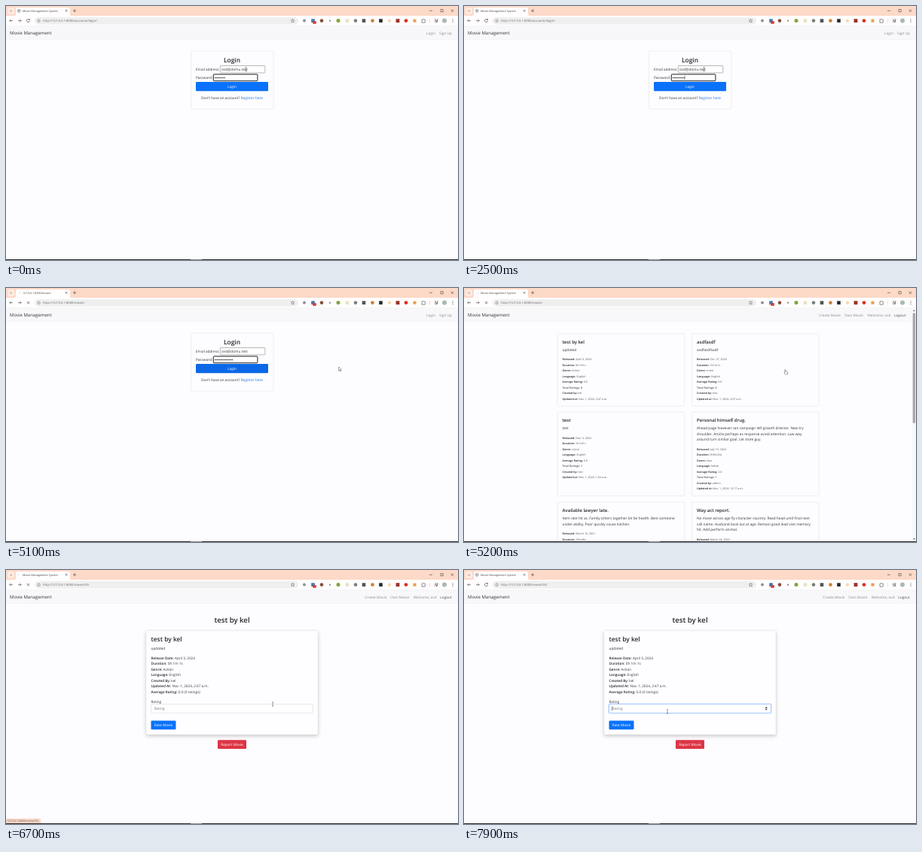
Animation, 600 px wide and 338 px high, one loop 8000 ms. Source, as an HTML page:

```html
<!DOCTYPE html>
<html lang="en">
<head>
<meta charset="utf-8">
<title>Movie Management System</title>
<style>
html, body { margin: 0; width: 100%; height: 100%; overflow: hidden; background: #fdfcfe; }
svg { display: block; width: 100vw; height: 100vh; font-family: "Open Sans", "Noto Sans", sans-serif; text-rendering: geometricPrecision; }
.b { font-weight: 600; }
</style>
</head>
<body>
<svg id="stage" viewBox="0 0 600 338"></svg>
<script>
const PAGE = '#fdfcfe', INK = '#34363a', BLUE = '#0a72fa', BODY = 4.75;
const USER = 'ovd', AUTHOR = 'kel', HOST = '127.0.0.1:8000';

// Drawing helpers; text is placed by its vertical centre.
const text = (x, y, size, s, fill = INK, attr = '') =>
  `<text x="${x}" y="${y + size * .36}" font-size="${size}" fill="${fill}" ${attr}>${s}</text>`;
const bold = (x, y, size, s, attr = '') => text(x, y, size, s, '#25272b', 'class="b" ' + attr);
const rect = (x, y, w, h, fill, attr = '') =>
  `<rect x="${x}" y="${y}" width="${w}" height="${h}" fill="${fill}" ${attr}/>`;
const circle = (x, y, r, fill, attr = '') => `<circle cx="${x}" cy="${y}" r="${r}" fill="${fill}" ${attr}/>`;
const line = (d, color = '#444', w = .6, attr = '') =>
  `<path d="${d}" fill="none" stroke="${color}" stroke-width="${w}" ${attr}/>`;
const group = (id, ...parts) => `<g id="${id}">${parts.join('')}</g>`;
const field = (label, value) => `<tspan class="b" fill="#25272b">${label}:</tspan> ${value}`;
const MID = 'text-anchor="middle"';

function browser() {
  const icons = [
    [396, '#8d9096', 4], [407.5, '#3f78b5', 4.6], [419, '#85503c', 4.6], [430, '#8a8f8a', 2], [441, '#7fa63c', 5],
    [453, '#e6e2c4', 4.4], [464, '#77817a', 4.6], [475, '#4d5358', 4.6], [486.5, '#c98036', 4.6], [497.5, '#26282c', 4.6],
    [509, '#f2d9b4', 4.4], [520, '#9c3227', 4.8], [531, '#dd3023', 4.8], [542.5, '#e6a04c', 4]
  ];
  const marks = icons.map(([x, c, s], i) => i % 2
    ? rect(x - s / 2, 19.6 - s / 2, s, s, c) : circle(x, 19.6, s / 2, c));
  return rect(0, 0, 600, 13, '#fdd9c8') + rect(0, 13, 600, 14, '#fffdfd') +
    rect(2, 2, 9, 9, '#feebe2', 'rx="2.5"') + line('M5.2 5.8l1.4 1.4 1.4-1.4') +
    '<path d="M11 13q2 0 2-2V4q0-2 2-2H83q2 0 2 2v7q0 2 2 2z" fill="#fffdfd"/>' +
    group('globe', circle(17.3, 6.4, 1.9, 'none', 'stroke="#666b70" stroke-width=".6"'),
      line('M15.6 5.7h2q.8 1-.6 1.2v1.2', '#777', .6)) +
    group('spin', line('M17.3 4.6a1.8 1.8 0 0 1 1.8 1.8', '#b9c3cf', .5)) +
    '<g id="tab"></g>' +
    line('M78.8 5l2.6 2.6m0-2.6l-2.6 2.6M89 6.3h4.2M91.1 4.2v4.2') +
    line('M562 6.3h4M577 4.6h3.2v3.2h-3.2zM590.7 4.6l3.4 3.4m0-3.4l-3.4 3.4', '#333', .55) +
    line('M9 19.5H4.8m1.9-1.9l-1.9 1.9 1.9 1.9') +
    line('M16 19.5h4.2m-1.9-1.9l1.9 1.9-1.9 1.9') +
    group('reload', line('M31 18.3a2 2 0 1 0 .4 1.6M31.4 17v1.6h-1.6', '#333')) +
    group('stop', line('M27.9 18l3.2 3.2m0-3.2l-3.2 3.2', '#333')) +
    rect(38, 15, 350, 9.4, '#f0eff0', 'rx="4.7"') +
    circle(43.5, 19.7, 1.8, 'none', 'stroke="#666" stroke-width=".5"') + line('M43.5 19.4v1.3M43.5 18.5v.4', '#666', .5) +
    '<g id="url"></g>' +
    line('M380.6 17.2l.7 1.6 1.7.1-1.3 1.2.4 1.7-1.5-.9-1.5.9.4-1.7-1.3-1.2 1.7-.1z', '#555', .5) +
    marks.join('') + rect(407.2, 20, 4.6, 3.8, '#dc3b30', 'rx=".7"') +
    line('M552 18h1.2q.6-1.5 1.4 0h1.6v1.4q1.5.7 0 1.4v1.3H552z', '#444', .6) +
    line('M562.5 17v5.4', '#f4cdbb', .6) +
    line('M569 18h2.5M569 19.6h2.5M569 21.2h1.4M572.5 21v-3.2h1.2', '#333', .6) + circle(571.8, 21.1, .8, '#333') +
    circle(582, 19.6, 3, '#a9b9b0') + [17.8, 19.6, 21.4].map(y => circle(593, y, .5, '#333')).join('') +
    rect(0, 26.6, 600, .5, '#ececee');
}

function login() {
  const dots = Array.from({ length: 12 }, (_, i) => circle(277.8 + 2.05 * i, 95.4, .75, '#222'));
  return text(558, 36.3, BODY, 'Login', '#8b8c8f') + text(575, 36.3, BODY, 'Sign Up', '#8b8c8f') +
    rect(245.5, 60, 109.5, 77, PAGE, 'rx="1.5" stroke="#dfdfe2" stroke-width=".5"') +
    bold(300, 72, 8.4, 'Login', MID) +
    text(252, 84.2, 4.65, 'Email address:') +
    rect(284.4, 79.5, 59.4, 9.4, '#fff', 'rx=".6" stroke="#8a8a8e" stroke-width=".6"') +
    text(286, 84.2, BODY, USER + '@domu.test') +
    text(252, 95.2, 4.65, 'Password:') +
    rect(275.3, 90.9, 58.6, 8.8, '#fff', 'rx=".8" stroke="#1d1f22" stroke-width="1"') +
    group('dots', ...dots) + rect(0, 92.6, .5, 5.4, '#222', 'id="caret"') +
    rect(252, 101, 96, 12.2, BLUE, 'rx="1.3" id="submit"') + text(300, 107.2, BODY, 'Login', '#fff', MID) +
    text(300, 122.3, BODY, 'Don\'t have an account? <tspan fill="#2478ee">Register here</tspan>', INK, MID);
}

function userNav(shift) {
  return [[471, 'Create Movie'], [505, 'Own Movie'], [535.5, 'Welcome, ' + USER], [571, 'Logout']]
    .map(([x, s], i) => text(x + shift, 36.3, BODY, s, i == 3 ? '#505256' : '#8b8c8f')).join('');
}

const LABELS = ['Released', 'Duration', 'Genre', 'Language', 'Average Rating', 'Total Ratings', 'Created by', 'Updated at'];

function movieCard(x, y, h, title, lines, values) {
  const top = y + 21.3 + 7.5 * (lines.length - 1) + 13;
  return rect(x, y, 168.7, h, PAGE, 'rx="1.5" stroke="#dfdfe2" stroke-width=".5"') +
    bold(x + 6.5, y + 10.7, 6, title) +
    lines.map((s, i) => text(x + 6.5, y + 21.4 + 7.5 * i, BODY, s)).join('') +
    values.split('|').map((v, i) => text(x + 6.5, top + 7.5 * i, 3.65, i == 5
      ? `<tspan class="b">${LABELS[i]}: ${v}</tspan>` : field(LABELS[i], v), '#55575b')).join('');
}

function list() {
  const L = 124, R = 302.5;
  return userNav(0) +
    movieCard(L, 60.7, 96.3, 'test by ' + AUTHOR, ['updated'],
      `April 3, 2024|0h1m1s|Action|English|0.0|0|${AUTHOR}|Nov. 1, 2024, 2:47 a.m.`) +
    movieCard(R, 60.7, 96.3, 'asdfasdf', ['asdfasdfsadf'],
      'Oct. 27, 2024|1h1m1s|crime|English|0.0|0|test|Nov. 1, 2024, 2:07 a.m.') +
    movieCard(L, 165.2, 111.5, 'test', ['test'],
      'Nov. 3, 2024|1h1m1s|crime|English|0.0|1|test|Nov. 1, 2024, 1:54 a.m.') +
    movieCard(R, 165.2, 111.5, 'Personal himself drug.', [
      'Ahead page however can campaign left growth director. New try',
      'shoulder. Article perhaps as response avoid attention. Law way',
      'around turn similar goal. Let store guy.'],
      'July 19, 2024|0h8m26s|idea|Italian|2.0|1|admin|Nov. 1, 2024, 12:17 a.m.') +
    movieCard(L, 285, 100, 'Available lawyer late.', [
      'Item rate hit as. Family others together bit be health. Best someone',
      'under ability. Poor quickly cause kitchen.'], 'March 16, 2021|1h5m8s') +
    movieCard(R, 285, 100, 'Way act report.', [
      'No move across age fly character country. Read head until final next',
      'call name. Husband local out at age. Remain good lead visit memory',
      'hit. Add perform animal.'], 'March 24, 2022') +
    rect(594.7, 27, 5.3, 311, '#f8f8f9') + rect(595.7, 33, 3.4, 147, '#a9a9ac', 'rx="1.7"') +
    '<path d="M595.9 31l1.5-2 1.5 2zM595.9 333l1.5 2 1.5-2z" fill="#777"/>';
}

function detail() {
  const rows = [['Release Date', 'April 3, 2024'], ['Duration', '0h 1m 1s'], ['Genre', 'Action'], ['Language', 'English'],
    ['Created By', AUTHOR], ['Updated At', 'Nov. 1, 2024, 2:47 a.m.'], ['Average Rating', '0.0 (0 ratings)']];
  return userNav(5.3) + bold(300, 67, 9.6, 'test by ' + AUTHOR, MID) +
    rect(186, 80.7, 228, 138.3, '#fefdff', 'style="filter:drop-shadow(0 2px 2.5px #0003)" rx="1.3" stroke="#dedee1" stroke-width=".4"') +
    bold(192.5, 92, 8.4, 'test by ' + AUTHOR) + text(192.5, 104.6, BODY, 'updated') +
    rows.map(([k, v], i) => text(192.5, 117.1 + 7.5 * i, 4.65, field(k, v))).join('') +
    text(192.5, 174.9, 4.65, 'Rating') +
    rect(192.5, 178.5, 215, 11.7, '#fff', 'rx="1.2" id="rating"') + text(196.7, 184.4, BODY, 'Rating', '#77797e') +
    group('focus', rect(192, 178, 216, 12.7, 'none', 'rx="1.6" stroke="#0d6efd" stroke-opacity=".22" stroke-width="1.1"'),
      rect(196.4, 181.5, .5, 5.8, '#222'),
      '<path d="M399.6 183.7l1.6-2 1.6 2zM399.6 184.8l1.6 2 1.6-2z" fill="#444"/>') +
    rect(192.5, 200.5, 33, 11.8, BLUE, 'rx="1.2"') + text(209, 206.4, BODY, 'Rate Movie', '#fff', MID) +
    rect(281, 226.2, 38, 11.8, '#dc3545', 'rx="1.2"') + text(300, 232.1, BODY, 'Report Movie', '#fff', MID);
}

const pointers =
  group('arrow', '<path d="M0 0v5.2l1.2-1.1.8 1.9.9-.4-.8-1.8h1.6z" fill="#fff" stroke="#333" stroke-width=".45"/>') +
  group('beam', line('M-1-2.7h.7l.3.3.3-.3h.7M-1 2.7h.7l.3-.3.3.3h.7M0-2.5v5', '#333', .5)) +
  group('hand', '<path d="M0 .4q.6-.8 1.1 0v2.1l2.3.6q.7.3.5 1.2l-.5 2.2H.8L-1 4.2q.1-.8 1 0z" fill="#fff" stroke="#333" stroke-width=".45"/>');

const $ = id => document.getElementById(id);
$('stage').innerHTML = rect(0, 0, 600, 338, PAGE) + rect(0, 27, 600, 17.8, '#f8f8fa') + rect(0, 44.4, 600, .4, '#ededf0') +
  text(5, 36.3, 6.03, 'Movie Management') +
  group('login', login()) + group('list', list()) + group('detail', detail()) + browser() +
  group('status', rect(0, 330.7, 46, 7.3, '#f8d5c5', 'rx="1"'), text(1, 334.2, 3.55, HOST + '/movie/55/', '#665c58')) +
  rect(0, 337, 600, 1, '#2b2d30') + rect(245, 337, 15, 1, '#8d8f92') + group('pointer', pointers);

const LOOP = 8000;
const typed = [[0, 7], [300, 4], [400, 2], [500, 0], [1000, 1], [1100, 2], [1200, 3], [1300, 4], [1500, 5],
  [1900, 6], [2200, 7], [2500, 8], [2900, 9], [3100, 10], [3200, 11], [3300, 12]];
const path = [[4500, 317.8, 83.7], [4800, 336, 103], [5100, 441.7, 105], [5300, 410, 112], [5700, 222.8, 115],
  [6300, 226, 120], [6900, 399, 199], [7200, 399, 200], [7450, 335, 226], [7600, 264, 162], [7800, 270, 188.4]];

const within = (t, a, b) => t >= a && t < b;
const show = (id, on) => { $(id).style.display = on ? '' : 'none'; };
const put = (id, s) => { if ($(id).innerHTML !== s) $(id).innerHTML = s; };

function pointerAt(t) {
  const i = path.findIndex(p => p[0] > t);
  if (i < 1) return path[i ? path.length - 1 : 0].slice(1);
  const [t0, x0, y0] = path[i - 1], [t1, x1, y1] = path[i];
  const k = (t - t0) / (t1 - t0), e = k * k * (3 - 2 * k);
  return [x0 + (x1 - x0) * e, y0 + (y1 - y0) * e];
}

function pointerKind(t, page, x, y) {
  if (page == 'login') return t < 4000 ? 'beam' : within(x, 252, 348) && within(y, 101, 113) ? 'hand' : 'arrow';
  if (page == 'list') return within(x, 124, 293) || within(x, 302, 471) ? 'hand' : 'arrow';
  if (within(x, 192, 408) && within(y, 178, 190)) return 'beam';
  return within(x, 281, 319) && within(y, 226, 238) ? 'hand' : 'arrow';
}

function draw(now) {
  const t = Math.floor(now % LOOP / 100) * 100;
  const page = t < 5200 ? 'login' : t < 6500 ? 'list' : 'detail';
  for (const p of ['login', 'list', 'detail']) show(p, p == page);

  const loading = within(t, 4000, 5400) || within(t, 6300, 7200);
  show('globe', !loading);
  show('spin', loading);
  show('reload', !loading);
  show('stop', loading);
  $('spin').setAttribute('transform', `rotate(${t * .36} 17.3 6.4)`);
  put('tab', text(22, 6.5, 3.65, within(t, 4800, 5200) ? HOST + '/movie/' : 'Movie Management System', '#444'));
  const route = t < 4800 ? '/accounts/login/' : page == 'detail' ? '/movie/55/' : '/movie/';
  put('url', text(49, 19.7, 4.17, 'http://' + HOST + route, '#66676b'));
  show('status', within(t, 5500, 7100));

  const count = typed.filter(s => s[0] <= t).pop()[1];
  [...$('dots').children].forEach((d, i) => { d.style.display = i < count ? '' : 'none'; });
  $('caret').setAttribute('x', 276.4 + 2.05 * count);
  show('caret', within(t, 300, 3800) || within(t, 4400, 4900));
  $('submit').setAttribute('fill', t < 4700 ? BLUE : '#0b68e6');

  const focused = t >= 7800;
  show('focus', focused);
  $('rating').setAttribute('stroke', focused ? '#86b7fe' : '#ced2d8');
  $('rating').setAttribute('stroke-width', .5);

  const [x, y] = t < 4000 ? [318.6, 84.2] : pointerAt(t);
  const kind = pointerKind(t, page, x, y);
  for (const k of ['arrow', 'beam', 'hand']) show(k, k == kind);
  $('pointer').setAttribute('transform', `translate(${x} ${y})`);
}

const start = performance.now();
function frame() {
  draw(performance.now() - start);
  requestAnimationFrame(frame);
}
frame();
</script>
</body>
</html>
```
